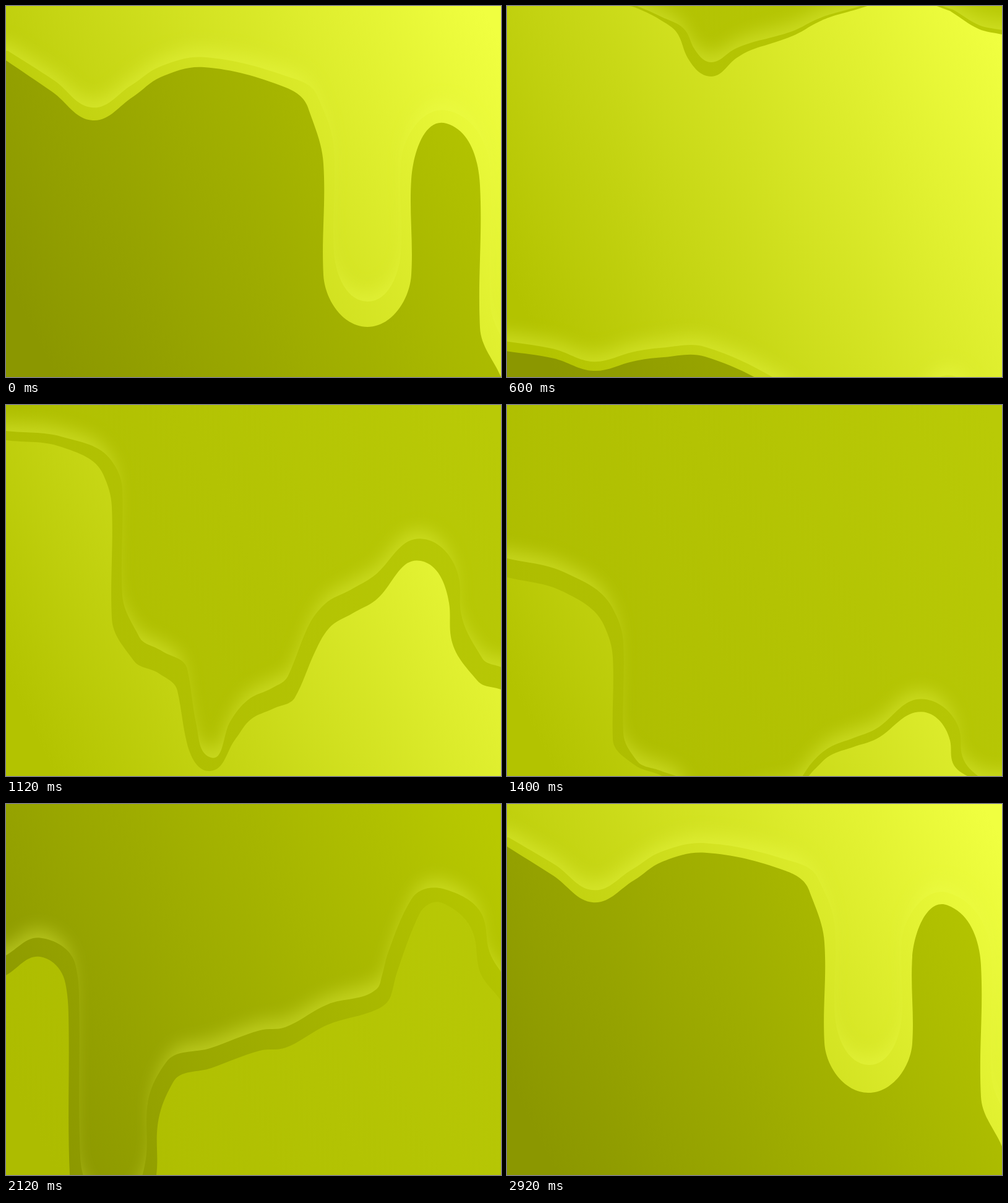
Write an HTML page that moves like this. It is 800 px wide and 600 px high and loops after 2960 ms.

```html
<!DOCTYPE html>
<html lang="en">
<head>
<meta charset="utf-8">
<title>Dripping slime</title>
<style>
  html, body { margin: 0; width: 100%; height: 100%; overflow: hidden; background: #a4b200; }
  svg { display: block; width: 800px; height: 600px; }
</style>
</head>
<body>
<svg id="stage" viewBox="0 0 800 600" xmlns="http://www.w3.org/2000/svg">
  <defs id="defs">
    <filter id="soft" filterUnits="userSpaceOnUse" x="-80" y="-120" width="960" height="840" color-interpolation-filters="sRGB">
      <feGaussianBlur stdDeviation="14"/>
    </filter>
  </defs>
</svg>
<script>
const LOOP = 2960, STEP = 40, LAG = 32, INSET = 17;
const stage = document.getElementById('stage');
const defs = document.getElementById('defs');
const layers = [];

function add(parent, tag, attrs = {}) {
  const el = document.createElementNS('http://www.w3.org/2000/svg', tag);
  for (const key in attrs) el.setAttribute(key, attrs[key]);
  return parent.appendChild(el);
}

// Edge points are [x, early y, late y]; early, late and exit give the y or the fall per LAG.
function addLayer({ id, colors, start, times, edge, earlyFall, lateFall, exitY }) {
  const gradient = add(defs, 'linearGradient', {
    id: id + 'Fill', gradientUnits: 'userSpaceOnUse', x1: -178, y1: 90, x2: 614, y2: -310
  });
  colors.forEach((color, k) => add(gradient, 'stop', { offset: k, 'stop-color': color }));
  const clip = add(add(defs, 'clipPath', { id: id + 'Inner' }), 'path');
  const group = add(stage, 'g');
  const body = add(group, 'path', { fill: `url(#${id}Fill)` });
  const lit = add(group, 'g', { 'clip-path': `url(#${id}Inner)` });
  const glow = add(lit, 'path', { fill: '#f0ff50', 'fill-opacity': 0.38, filter: 'url(#soft)' });
  const nodes = edge.map(([x, early, late]) => ({
    x,
    ys: [-40, early, late, exitY(x), exitY(x) + 90],
    falls: [0, earlyFall(Math.max(0, early)), lateFall(late), 14, 0]
  }));
  layers.push({ start, times, nodes, clip, group, body, glow });
}

const brightEdge = [
  [0, -8, 88], [75, 22, 139], [140, 50, 185], [205, 27, 147], [250, 7, 115], [320, -3, 99],
  [450, 8, 131], [488, 31, 164], [513, 76, 255], [513, 88, 435], [584, 147, 519], [655, 98, 435],
  [655, 88, 280], [712, 51, 190], [766, 140, 290], [766, 193, 520], [800, 253, 600]
];
addLayer({
  id: 'bright', colors: ['#b3c300', '#f0ff40'], start: 2350, times: [0, 330, 610, 1210, 1460],
  edge: brightEdge,
  earlyFall: y => Math.min(58, 3 + 0.0012 * y * y),
  lateFall: y => Math.min(39, 11 + 0.054 * y),
  exitY: x => x < 600
    ? 558 + 9 * Math.min(1, x / 250) + 27 * Math.exp(-(((x - 140) / 62) ** 2)) + 0.0037 * Math.max(0, x - 320) ** 2
    : 612 + 0.02 * (x - 712) ** 2
});

const middleEdge = [
  [0, -35, 57], [90, -28, 68], [157, -15, 112], [171, -12, 165], [171, -8, 345], [206, 2, 413],
  [247, 22, 434], [277, 47, 462], [292, 84, 545], [330, 114, 592], [371, 84, 540], [395, 71, 509],
  [432, 59, 491], [467, 46, 473], [499, 28, 400], [522, 18, 361], [560, 7, 337], [597, -3, 316],
  [670, -6, 252], [716, 8, 320], [719, 10, 375], [762, 37, 446], [800, 46, 460]
];
addLayer({
  id: 'middle', colors: ['#adbc00', '#b9ca06'], start: 230, times: [0, 370, 890, 1530, 1780],
  edge: middleEdge,
  earlyFall: y => 3 + 0.0016 * y * y,
  lateFall: y => 40 - 0.0003 * (y - 340) ** 2,
  exitY: x => Math.min(670, 567 + 0.4 * Math.max(0, x - 20))
});

const darkEdge = [
  [0, 16, 277], [55, 20, 247], [96, 62, 290], [101, 105, 340], [103, 300, 600], [172, 378, 680],
  [243, 300, 600], [245, 195, 520], [270, 131, 450], [332, 104, 427], [410, 64, 399], [452, 56, 394],
  [520, 36, 357], [600, 20, 332], [622, 8, 310], [632, 1, 272], [668, -15, 178], [705, -20, 160],
  [757, 2, 215], [764, 8, 265], [800, 40, 318]
];
addLayer({
  id: 'dark', colors: ['#8b9700', '#b8c900'], start: 1300, times: [0, 460, 820, 1380, 1630],
  edge: darkEdge,
  earlyFall: y => 3 + 0.00034 * y * y,
  lateFall: y => Math.min(31, 7 + 0.1 * y),
  exitY: x => x > 600 ? 615 : 630
});

// Cubic Hermite interpolation of a node's height.
function heightAt(times, { ys, falls }, time) {
  const u = Math.max(0, Math.min(time, times[times.length - 1]));
  let k = 0;
  while (k < times.length - 2 && u > times[k + 1]) k++;
  const span = times[k + 1] - times[k];
  const s = (u - times[k]) / span, s2 = s * s, s3 = s2 * s;
  const blend = 3 * s2 - 2 * s3;
  return ys[k] * (1 - blend) + ys[k + 1] * blend +
    span / LAG * ((s3 - 2 * s2 + s) * falls[k] + (s3 - s2) * falls[k + 1]);
}

// Unit tangents; near-vertical segments dominate so the sides of drips stay straight.
function tangents(points) {
  const segments = points.slice(1).map(([x, y], i) => {
    const dx = x - points[i][0], dy = y - points[i][1];
    const weight = 0.15 + (dy / (Math.hypot(dx, dy) || 1)) ** 16;
    return [dx * weight, dy * weight];
  });
  return points.map((p, i) => {
    const a = segments[i - 1] || [0, 0], b = segments[i] || [0, 0];
    const dx = a[0] + b[0], dy = a[1] + b[1], length = Math.hypot(dx, dy) || 1;
    return [dx / length, dy / length];
  });
}

// Smooth edge through the points, closed along the line y = closeY.
function region(points, closeY) {
  const dirs = tangents(points);
  const f = n => n.toFixed(1);
  const [x0, y0] = points[0];
  let d = `M-80 ${closeY}L-80 ${f(y0)}L${f(x0)} ${f(y0)}`;
  for (let i = 1; i < points.length; i++) {
    const [ax, ay] = points[i - 1], [bx, by] = points[i];
    const h = 0.36 * Math.hypot(bx - ax, by - ay);
    const [ux, uy] = dirs[i - 1], [vx, vy] = dirs[i];
    d += `C${f(ax + ux * h)} ${f(ay + uy * h)} ${f(bx - vx * h)} ${f(by - vy * h)} ${f(bx)} ${f(by)}`;
  }
  return d + `L880 ${f(points[points.length - 1][1])}L880 ${closeY}Z`;
}

function draw(time) {
  const age = layer => (time - layer.start + LOOP) % LOOP;
  for (const layer of [...layers].sort((a, b) => age(b) - age(a))) {
    const u = age(layer), { nodes, times } = layer;
    const outer = nodes.map(n => [n.x, heightAt(times, n, u)]);
    const dirs = tangents(outer);
    const inset = (amount, lift) => nodes.map((n, i) =>
      [n.x + amount * dirs[i][1] ** 3, heightAt(times, n, u - LAG) - lift]);
    layer.body.setAttribute('d', region(outer, -200));
    layer.clip.setAttribute('d', region(inset(INSET, 0), -200));
    layer.glow.setAttribute('d', region(inset(INSET * 0.4, 14), 900));
    stage.appendChild(layer.group);
  }
}

const origin = performance.now();
function tick() {
  const elapsed = (performance.now() - origin) % LOOP;
  draw(Math.floor(elapsed / STEP) * STEP);
  requestAnimationFrame(tick);
}
draw(0);
requestAnimationFrame(tick);
</script>
</body>
</html>
```
